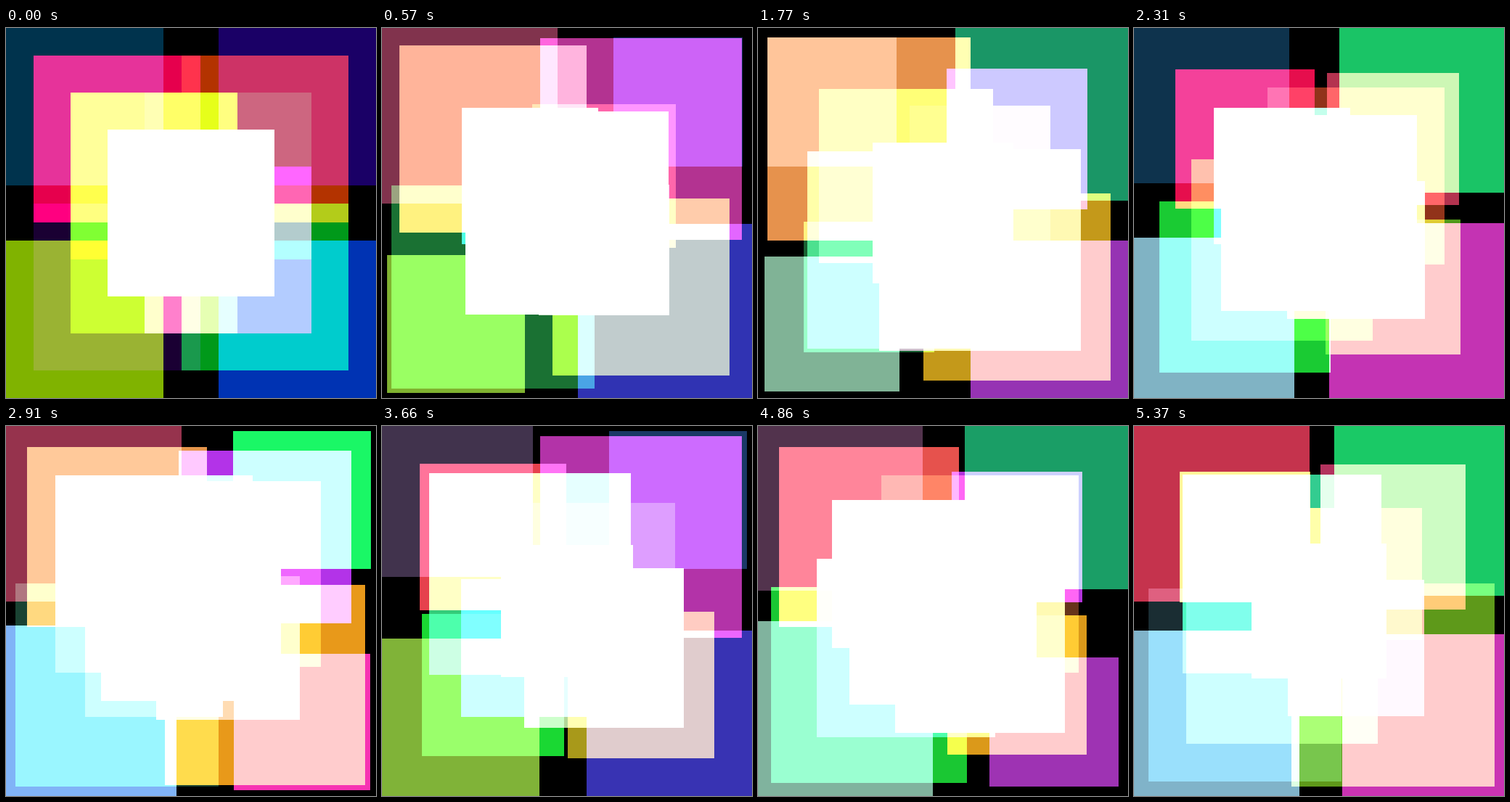
These frames come from a looping animation (510 by 510 pixels, 5400 ms). An HTML page with a canvas:

```html
<!DOCTYPE html>
<html>
<head>
<meta charset="utf-8">
<title>Pulsing squares</title>
<style>
html, body { margin: 0; width: 100%; height: 100%; overflow: hidden; background: #000; }
canvas { display: block; width: 510px; height: 510px; }
</style>
</head>
<body>
<canvas id="stage" width="510" height="510"></canvas>
<script>
const SIZE = 510, STEP_MS = 30, STEPS = 180, FPS = 30;
const ctx = document.getElementById('stage').getContext('2d');

// Repeating 0..1 ramp, at `rate` tenths per second
const ramp = rate => step => rate * step % (10 * FPS) / (10 * FPS);

// A pulse speed in radians per second and three channels, each fixed or a ramp
const square = (pulse, ...rgb) => ({ pulse, rgb });

// Each arm runs from one corner towards the centre
const arms = [
  { dx: -1, dy: -1, squares: [
    square(2.4, ramp(8), 0.2, 0.3),
    square(4, 0.9, ramp(8), 0.3),
    square(6.5, 0.2, 0.8, ramp(11))] },
  { dx: 1, dy: -1, squares: [
    square(7.5, 0.1, ramp(3), 0.4),
    square(2, 0.7, 0.2, ramp(9)),
    square(6, ramp(10), 0.2, 0.1)] },
  { dx: -1, dy: 1, squares: [
    square(8.5, 0.5, 0.7, ramp(3)),
    square(2.5, 0.1, ramp(7), 0.2),
    square(7.5, 0.2, 0.5, ramp(12))] },
  { dx: 1, dy: 1, squares: [
    square(3.2, ramp(3), 0.2, 0.7),
    square(4.5, ramp(9), 0.6, 0.1),
    square(7, 0.7, ramp(7), 0.6)] }
];
const middle = square(2.8, 1, 1, 1);

function drawSquare({ pulse, rgb }, x, y, step) {
  const half = SIZE * (0.45 + 0.1 * Math.sin(pulse * step / FPS)) / 2;
  const span = c => [Math.round(c * SIZE - half), Math.round(c * SIZE + half)];
  const [left, right] = span(x), [top, bottom] = span(y);
  const bytes = rgb.map(v => Math.round(255 * (typeof v === 'function' ? v(step) : v)));
  ctx.fillStyle = `rgb(${bytes.join(',')})`;
  ctx.fillRect(left, top, right - left, bottom - top);
}

function draw(ms) {
  const step = Math.floor(ms / STEP_MS) % STEPS;
  ctx.globalCompositeOperation = 'source-over';
  ctx.fillStyle = '#000';
  ctx.fillRect(0, 0, SIZE, SIZE);
  ctx.globalCompositeOperation = 'lighter';
  for (const { dx, dy, squares } of arms) {
    squares.forEach((s, i) => {
      const reach = (3 - i) / 10;
      drawSquare(s, 0.5 + dx * reach, 0.5 + dy * reach, step);
    });
  }
  drawSquare(middle, 0.5, 0.5, step);
}

const start = performance.now();
function tick() {
  draw(performance.now() - start);
  requestAnimationFrame(tick);
}
tick();
</script>
</body>
</html>
```
